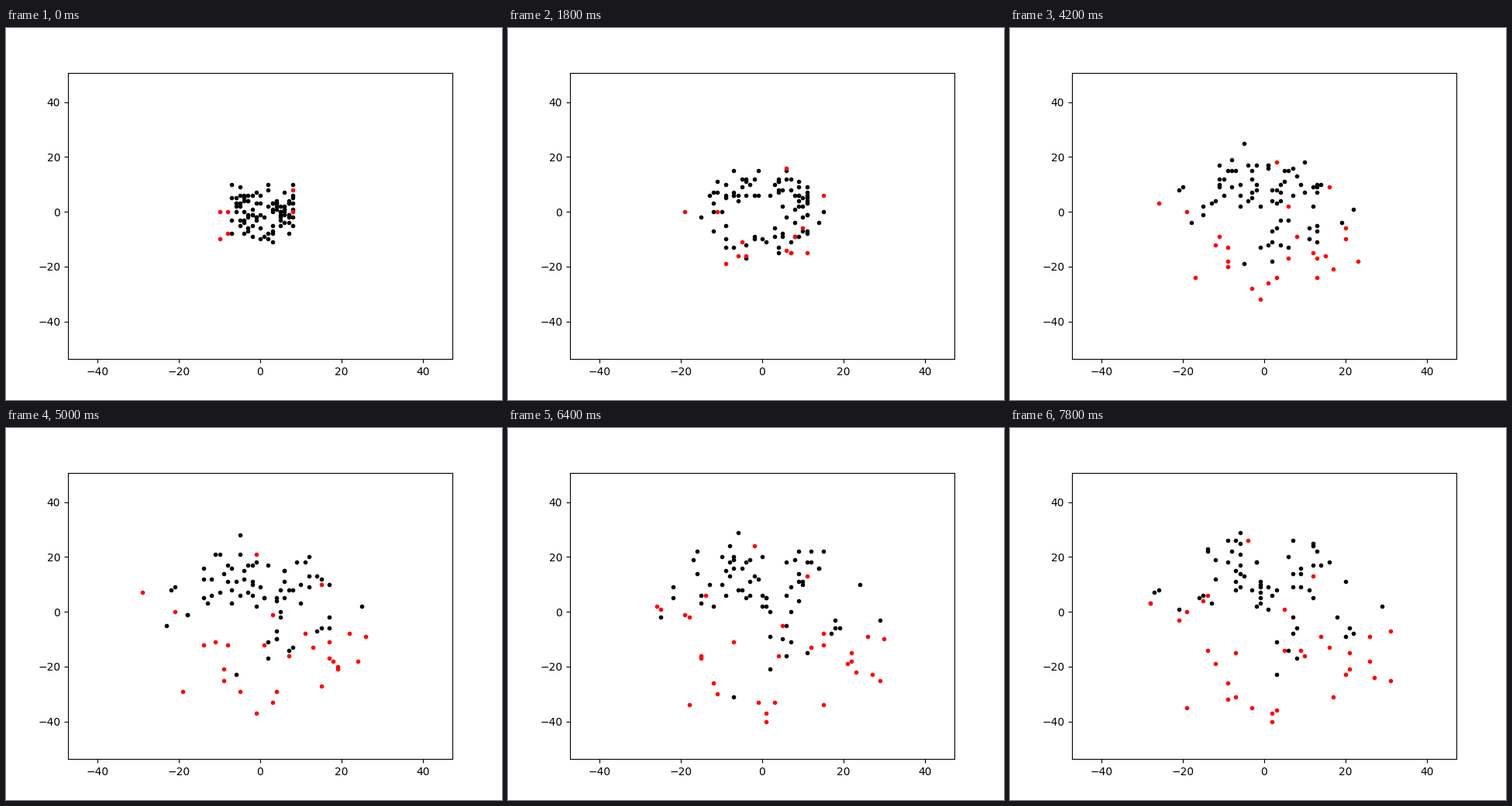
Animation, 640 px wide and 480 px high, one loop 8000 ms. Source, as a matplotlib script:

```python
import numpy as np
import matplotlib.pyplot as plt
from matplotlib.animation import FuncAnimation

FRAMES, STEP_MS = 40, 200
LAST = FRAMES - 1
COUNT = 100
rng = np.random.default_rng(12)

# Dots that are infected from the beginning
SEEDS = [(8, 8), (8, 0), (-10, 0), (-8, 0), (-8, -8), (-10, -10)]

# Where the crowd drifts to: x, y, spread, number of dots
CLUMPS = [(-8, 24, 5, 14), (7, 18, 6, 16), (1, 6, 6, 20), (-22, 4, 5, 12),
          (25, -5, 4, 7), (20, -23, 6, 7), (3, -15, 8, 16), (-4, -32, 7, 8)]


def by_angle(pts):
    return np.argsort(np.arctan2(pts[:, 1], pts[:, 0]))


def make_starts():
    n = COUNT - len(SEEDS)
    x = rng.integers(-7, 9, n)
    y = np.clip(np.round(rng.normal(0, 5.2, n)), -11, 10)
    return np.vstack([SEEDS, np.column_stack([x, y])])


def make_ends(starts):
    pts = np.vstack([rng.normal((x, y), spread, (n, 2))
                     for x, y, spread, n in CLUMPS])
    pts = np.clip(pts, (-28, -40), (31, 31))
    # match by direction so that paths lead outward
    ends = np.zeros_like(pts)
    ends[by_angle(starts)] = pts[by_angle(pts)]
    return ends


def make_onset(ends):
    # the infection spreads mostly among those far out and low down
    risk = 0.4 * np.abs(ends[:, 0]) - ends[:, 1] + rng.normal(0, 10, COUNT)
    risk[:len(SEEDS)] += 1000
    rank = np.argsort(np.argsort(-risk))
    return np.interp(rank, [5, 13, 21, 30, 33], [0, 9, 15, 29, LAST],
                     right=np.inf)


def make_wander():
    walk = rng.integers(-1, 2, (FRAMES, COUNT, 2)).cumsum(axis=0).astype(float)
    walk -= walk[0]
    return walk - np.linspace(0, 1, FRAMES)[:, None, None] * walk[-1]


starts = make_starts()
ends = make_ends(starts)
onset = make_onset(ends)
wander = make_wander()


def places(t):
    u = t / LAST
    w = (np.sin(np.pi / 2 * u) + u * u * (3 - 2 * u)) / 2
    pos = starts + (ends - starts) * w
    # an early push hollows out the centre
    push = 7 * (t / 8 * np.exp(1 - t / 8)) ** 2
    r = np.maximum(np.hypot(pos[:, 0], pos[:, 1]), 0.5)
    pos = pos * (np.hypot(r, push) / r)[:, None]
    return np.round(pos + wander[t])


fig, ax = plt.subplots(figsize=(6.4, 4.8), dpi=100)
ax.set_xlim(-47.3, 47.3)
ax.set_ylim(-53.75, 50.75)
healthy, = ax.plot([], [], "k.")
infected, = ax.plot([], [], "r.")


def draw(t):
    pos = places(t)
    ill = onset <= t
    healthy.set_data(pos[~ill, 0], pos[~ill, 1])
    infected.set_data(pos[ill, 0], pos[ill, 1])
    return healthy, infected


anim = FuncAnimation(fig, draw, frames=FRAMES, interval=STEP_MS, repeat=True,
                     repeat_delay=0)
plt.show()
```
